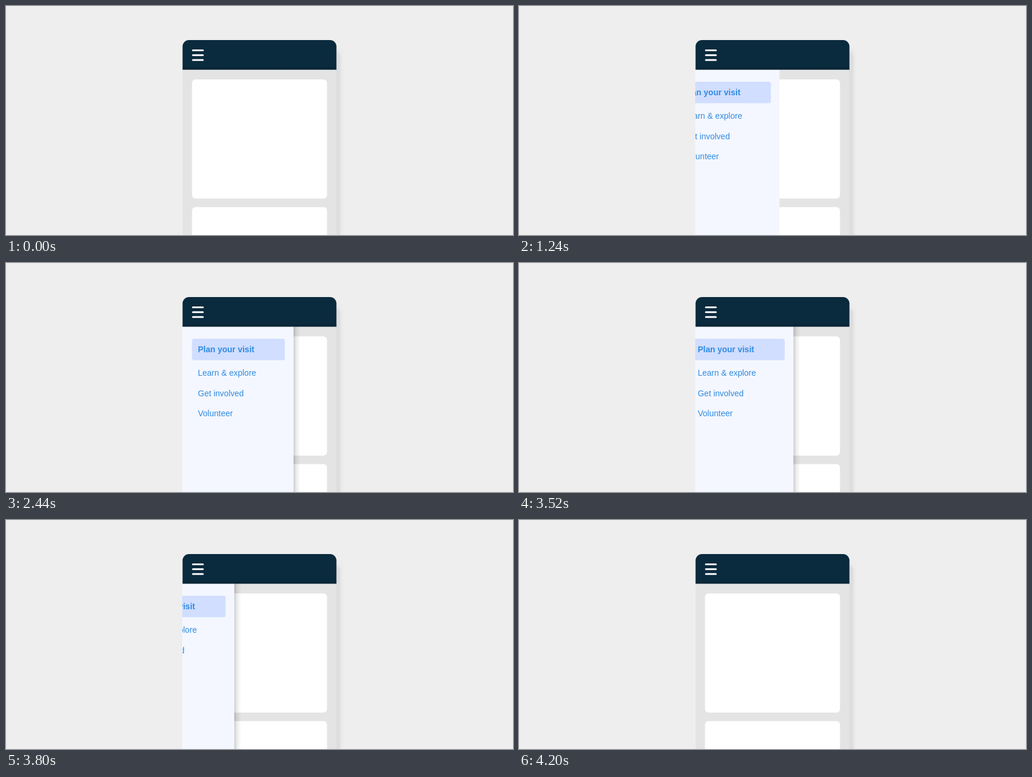
Animation, 860 px wide and 390 px high, one loop 4.78 s. Source, as an HTML page:

```html
<!DOCTYPE html>
<html lang="en">
<head>
<meta charset="utf-8">
<title>Sliding menu</title>
<style>
  html, body { margin: 0; width: 100%; height: 100%; overflow: hidden; background: #eee; }
  svg { display: block; width: 860px; height: 390px; }
  text { font: 14px "Liberation Sans", Arial, sans-serif; fill: #308be2; }
  .active { font-weight: bold; }

  .menu { animation: slide 4780ms infinite; }
  .edge { animation: lift 4780ms linear infinite; }

  /* Each slide is a cubic ease in, then a cubic ease out. */
  @keyframes slide {
    0%, 14.31% { transform: translateX(-203px); }
    14.31%, 72.28% { animation-timing-function: cubic-bezier(.333, 0, .667, 0); }
    23.755%, 80.596% {
      transform: translateX(-101.5px);
      animation-timing-function: cubic-bezier(.333, 1, .667, 1);
    }
    33.2%, 72.28% { transform: translateX(0); }
    88.91%, 100% { transform: translateX(-203px); }
  }
  @keyframes lift {
    0%, 30.13% { opacity: 0; }
    35.15%, 90% { opacity: 1; }
    90.1%, 100% { opacity: 0; }
  }
</style>
</head>
<body>
<svg viewBox="0 0 860 390">
  <defs>
    <clipPath id="screen"><rect x="299.5" y="108.5" width="261" height="290"/></clipPath>
    <linearGradient id="edgeShade">
      <stop offset="0" stop-opacity=".2"/>
      <stop offset=".45" stop-opacity=".07"/>
      <stop offset="1" stop-opacity="0"/>
    </linearGradient>
    <linearGradient id="barShade" x2="0" y2="1">
      <stop offset="0" stop-opacity="0"/>
      <stop offset="1" stop-opacity=".16"/>
    </linearGradient>
    <filter id="soft" x="-20%" y="-20%" width="140%" height="140%"><feGaussianBlur stdDeviation="4"/></filter>
    <filter id="crisp" x="-20%" y="-20%" width="140%" height="140%"><feGaussianBlur stdDeviation="1"/></filter>
  </defs>

  <rect x="310" y="72" width="258" height="360" rx="11" fill-opacity=".03" filter="url(#soft)"/>
  <rect x="310" y="76" width="257.5" height="360" rx="11" fill-opacity=".045" filter="url(#crisp)"/>

  <rect x="299.5" y="58" width="261" height="350" rx="11" fill="#e4e4e4"/>
  <g fill="#fff">
    <rect x="315.5" y="125" width="229" height="203" rx="6"/>
    <rect x="315.5" y="342.5" width="229" height="203" rx="6"/>
  </g>

  <g clip-path="url(#screen)">
    <g class="menu">
      <rect class="edge" x="487.5" y="108" width="12" height="290" fill="url(#edgeShade)"/>
      <rect x="260" y="108" width="227.5" height="290" fill="#f4f7ff"/>
      <rect x="315.5" y="129" width="157.5" height="36.5" rx="3.5" fill="#d1deff"/>
      <text class="active" x="325.5" y="151.5">Plan your visit</text>
      <text x="325.5" y="192">Learn &amp; explore</text>
      <text x="325.5" y="226.5">Get involved</text>
      <text x="325.5" y="261">Volunteer</text>
    </g>
  </g>

  <path d="M299.5 108.5V69a11 11 0 0 1 11-11h239a11 11 0 0 1 11 11v39.5z" fill="#0a2a3d"/>
  <rect x="299.5" y="102.5" width="261" height="6" fill="url(#barShade)"/>
  <path d="M317 75.5h17M317 83.75h17M317 92h17" stroke="#fff" stroke-width="3" stroke-linecap="round"/>
</svg>
</body>
</html>
```
